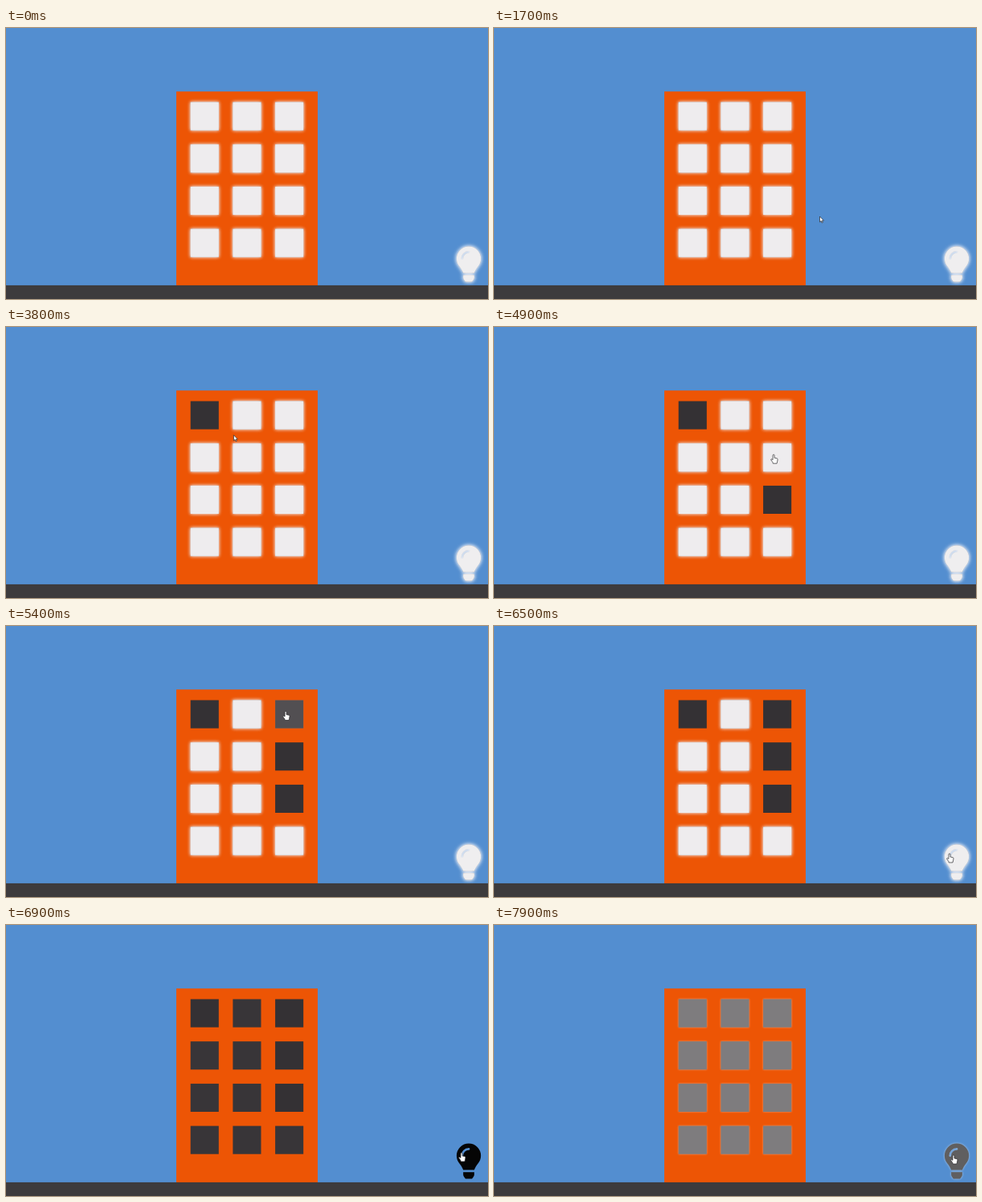
An HTML page for the animation above (8000 ms loop, 600 px wide and 338 px high).

```html
<!DOCTYPE html>
<html lang="en">
<head>
<meta charset="utf-8">
<title>Building lights</title>
<style>
  html, body { margin: 0; width: 100%; height: 100%; overflow: hidden; background: #538ed0; }
  svg { display: block; width: 100vw; height: 100vh; }
  .lit { --on: 1; opacity: var(--on); }
  .pane { filter: drop-shadow(0 0 calc(var(--on) * 2.2px) #efedef) drop-shadow(0 0 calc(var(--on) * 1px) #efedef60); }
  .lamp { filter: drop-shadow(0 0 calc(var(--on) * 2.2px) #f2f2f6) drop-shadow(0 0 calc(var(--on) * 2.2px) #f2f2f6a0); }
  .cursor { fill: #fff; stroke: #29292b; stroke-width: .7; stroke-linejoin: round; }
</style>
</head>
<body>
<svg viewBox="0 0 600 338">
  <defs>
    <path id="bulb" transform="translate(560.9 272.6) scale(.0859)" fill-rule="evenodd" d="M96 416H256V454Q256 464 250 472L233 498Q224 512 207 512H145Q128 512 119 498L102 472Q96 464 96 454Z
      M0 176A176 176 0 0 1 352 176C352 220 336 261 308 292C292 311 266 350 256 384H96C86 350 60 311 44 292C16 261 0 220 0 176Z
      M176 96A16 16 0 0 0 176 64A112 112 0 0 0 64 176A16 16 0 0 0 96 176A80 80 0 0 1 176 96Z"/>
  </defs>
  <rect width="600" height="338" fill="#538ed0"/>
  <rect x="212" y="79.2" width="176" height="242" fill="#ed5505"/>
  <rect y="320.9" width="600" height="18" fill="#3d3b3d"/>
  <g id="windows"></g>
  <use href="#bulb"/>
  <g id="lamp" class="lit lamp"><use href="#bulb" fill="#efeeef"/></g>
  <g id="cursor" class="cursor">
    <path id="arrow" d="M0 0V7L1.6 5.6L2.7 8L3.8 7.5L2.7 5.2H5Z"/>
    <path id="hand" d="M-1 .9A1 1 0 0 1 1 .9V4L4.2 4.7Q5.1 5 5 6L4.5 9L4 11H-.8L-1.2 9.4L-3.3 6.6Q-3.6 5.4 -2.3 5.6L-1 6.4Z"/>
  </g>
</svg>
<script>
const LOOP = 8000, TICK = 100, FADE = 300;
const ALL_OFF = 6650, ALL_ON = 7838;
const COLUMNS = 3, ROWS = 4, SIZE = 35.1, PITCH = 52.7, LEFT = 229.7, TOP = 92.5;

const byId = id => document.getElementById(id);
const show = (el, on) => el.style.display = on ? '' : 'none';
const setLight = (el, value) => el.style.setProperty('--on', value);

function addPane(x, y, fill, className) {
  const el = document.createElementNS('http://www.w3.org/2000/svg', 'rect');
  const attrs = { x, y, width: SIZE, height: SIZE, fill, class: className };
  for (const key in attrs) el.setAttribute(key, attrs[key]);
  return byId('windows').appendChild(el);
}

const windows = Array.from({ length: COLUMNS * ROWS }, (_, i) => {
  const x = LEFT + i % COLUMNS * PITCH, y = TOP + Math.floor(i / COLUMNS) * PITCH;
  addPane(x, y, '#343134', '');
  return { x, y, lit: addPane(x, y, '#eeecee', 'lit pane'), off: ALL_OFF };
});

const stop = (arrive, leave, x, y) => ({ arrive, leave, x, y });

// hover a window, clicking it on the way
function press(index, arrive, click, leave, dx = 13) {
  const w = windows[index];
  w.off = click;
  return stop(arrive, leave, w.x + dx, w.y + 14);
}

const tour = [
  stop(500, 500, 478, 334),
  stop(1700, 1700, 405.5, 235),
  press(0, 2700, 3050, 3580, 30),
  press(8, 4400, 4450, 4650),
  press(5, 4900, 4950, 5000),
  press(2, 5200, 5230, 5400),
  stop(6300, 6900, 567, 284),
  stop(7500, LOOP, 572, 287)
];

function pointerAt(t) {
  const i = Math.max(0, tour.findIndex(s => s.leave >= t));
  const to = tour[i], from = tour[Math.max(0, i - 1)];
  const k = t < to.arrive && i ? (t - from.leave) / (to.arrive - from.leave) : 1;
  return [from.x + (to.x - from.x) * k, from.y + (to.y - from.y) * k];
}

function fade(t, start) {
  const k = Math.min(1, Math.max(0, (t - start) / FADE));
  return 1 - (1 - k) ** 2.2;
}

const light = (t, off) => 1 - fade(t, off) + fade(t, ALL_ON);
const inside = (x, y, left, top, w, h) => x >= left && x <= left + w && y >= top && y <= top + h;

function draw(t) {
  for (const w of windows) setLight(w.lit, light(t, w.off));
  setLight(byId('lamp'), light(t, ALL_OFF));

  const [x, y] = pointerAt(t);
  const overTarget = inside(x, y, 561, 272, 30, 45) ||
    windows.some(w => inside(x, y, w.x, w.y, SIZE, SIZE));
  show(byId('cursor'), t >= tour[0].arrive);
  show(byId('hand'), overTarget);
  show(byId('arrow'), !overTarget);
  byId('cursor').setAttribute('transform', `translate(${x} ${y})`);
}

const origin = performance.now();
function frame() {
  const t = (performance.now() - origin) % LOOP;
  draw(Math.floor(t / TICK) * TICK);
  requestAnimationFrame(frame);
}
frame();
</script>
</body>
</html>
```
